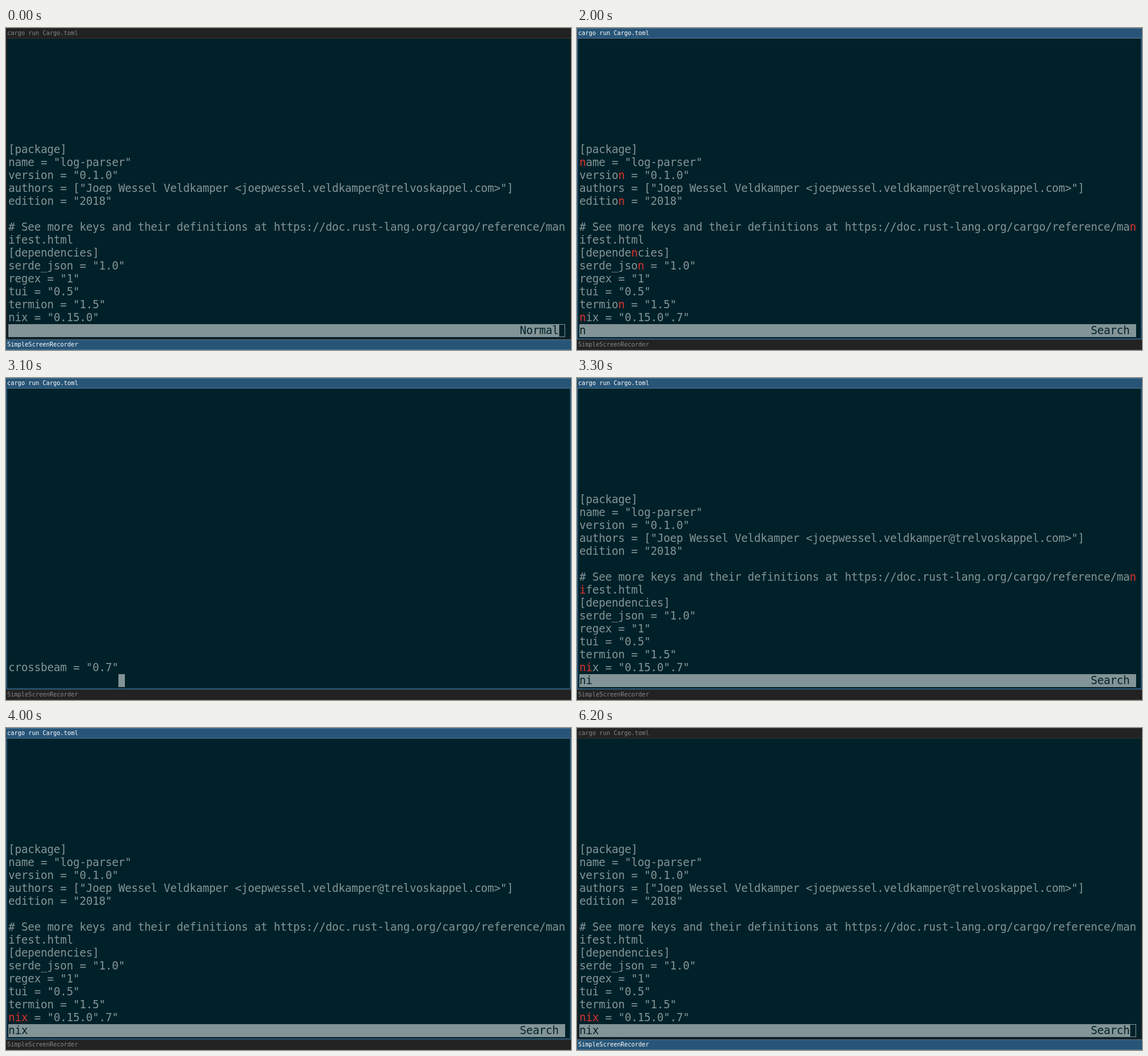
Recreate the animation shown at these times as an HTML page with a canvas. Size 960x548 px, loop 6.5 s.

```html
<!DOCTYPE html>
<html>
<head>
<meta charset="utf-8">
<title>Terminal search</title>
<style>
  html, body { margin: 0; width: 960px; height: 548px; overflow: hidden; background: #222; }
  canvas { display: block; }
</style>
</head>
<body>
<canvas id="stage" width="960" height="548"></canvas>
<script>
const ctx = document.getElementById('stage').getContext('2d');
const LOOP = 6500, COLS = 86, CELL = 11, ROW = 22, LEFT = 4, TOP = 196, BAR = 504;
const BACK = '#002129', INK = '#839496', RED = '#dc322f';

const lines = [
  '[package]',
  'name = "log-parser"',
  'version = "0.1.0"',
  'authors = ["Joep Wessel Veldkamper <joepwessel.veldkamper@trelvoskappel.com>"]',
  'edition = "2018"',
  '',
  '# See more keys and their definitions at https://doc.rust-lang.org/cargo/reference/manifest.html',
  '[dependencies]',
  'serde_json = "1.0"',
  'regex = "1"',
  'tui = "0.5"',
  'termion = "1.5"',
  'nix = "0.15.0"'
];
const leftover = '.7"';  // tail of the longer line that scrolled past

// Each step holds until the next one starts.
const steps = [
  { at: 0, mode: 'Normal', query: '' },
  { at: 400, mode: 'Normal', query: '', focus: true },
  { at: 500, mode: 'Search', query: '', focus: true },
  { at: 2000, mode: 'Search', query: 'n', focus: true },
  { at: 3100, blank: 'crossbeam = "0.7"', cursor: 17, focus: true },
  { at: 3200, mode: 'Search', query: 'ni', focus: true },
  { at: 3600, blank: '', cursor: 85, focus: true },
  { at: 3700, mode: 'Search', query: 'nix', focus: true },
  { at: 6000, mode: 'Search', query: 'nix' }
];

function box(x, y, w, h, color) {
  ctx.fillStyle = color;
  ctx.fillRect(x, y, w, h);
}

function write(text, col, top, color, isHit = () => false) {
  ctx.font = '18.67px "DejaVu Sans Mono", monospace';
  [...text].forEach((char, i) => {
    const cell = col + i;
    ctx.fillStyle = isHit(i) ? RED : color;
    ctx.fillText(char, LEFT + cell % COLS * CELL, top + Math.floor(cell / COLS) * ROW + 17);
  });
}

function titleBar(text, y, focus) {
  box(0, y, 960, 18, focus ? '#4c7899' : '#333');
  box(0, y + 1, 960, 16, focus ? '#285577' : '#222');
  ctx.font = '10px "DejaVu Sans Mono", monospace';
  ctx.fillStyle = focus ? '#fff' : '#888';
  ctx.fillText(text, 2, y + 12);
}

function drawFile({ mode, query, focus }) {
  let top = TOP;
  lines.forEach((line, i) => {
    const last = i === lines.length - 1;
    const start = query ? line.lastIndexOf(query) : -1;
    const text = last && mode === 'Search' ? line + leftover : line;
    write(text, 0, top, INK, k => start >= 0 && k >= start && k < start + query.length);
    top += ROW * Math.max(1, Math.ceil(line.length / COLS));
  });
  box(LEFT, BAR, COLS * CELL, ROW, INK);
  write(query, 0, BAR, BACK);
  write(mode, 79, BAR, BACK);
  if (!focus) box(940, BAR + 1, CELL - 2, ROW - 2, BACK);
}

function draw(time) {
  const step = steps.findLast(s => s.at <= time);
  box(0, 0, 960, 548, step.focus ? '#285577' : '#222');
  box(2, 18, 956, 510, BACK);
  titleBar('cargo run Cargo.toml', 0, step.focus);
  titleBar('SimpleScreenRecorder', 530, !step.focus);
  if (step.mode) {
    drawFile(step);
  } else {
    write(step.blank, 0, BAR - ROW, INK);
    box(LEFT + step.cursor * CELL, BAR, CELL, ROW, INK);
  }
}

const begin = performance.now();
function tick() {
  draw((performance.now() - begin) % LOOP);
  requestAnimationFrame(tick);
}
tick();
</script>
</body>
</html>
```
